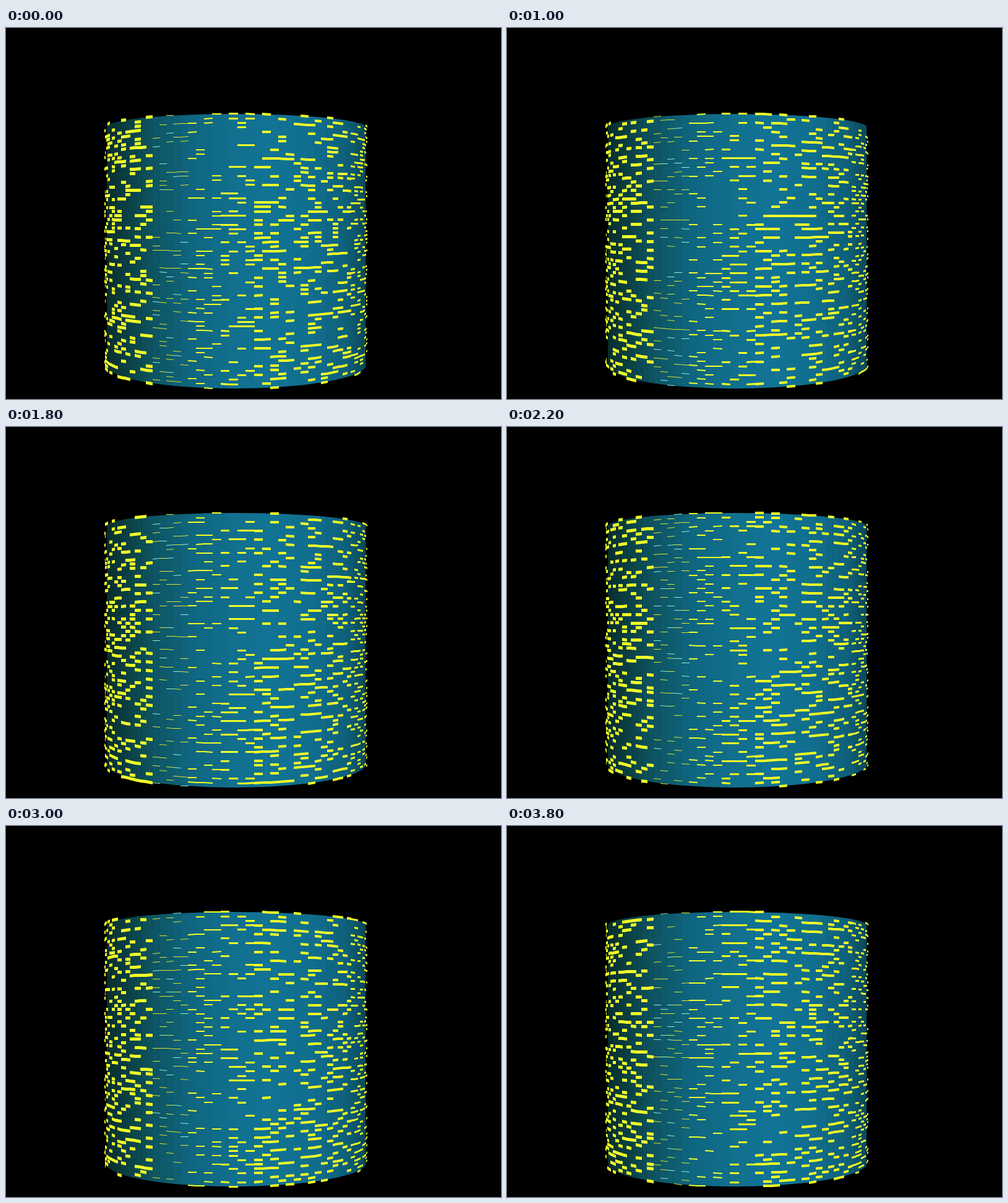
Recreate the animation shown at these times as an HTML page with a canvas. Size 800 by 600 pixels, loop 4 s.

```html
<!DOCTYPE html>
<html lang="en">
<head>
<meta charset="utf-8">
<title>Traffic on a cylinder</title>
<style>
html, body { margin: 0; width: 100%; height: 100%; overflow: hidden; background: #000; }
canvas { display: block; }
</style>
</head>
<body>
<canvas id="stage" width="800" height="600"></canvas>
<script>
const ctx = document.getElementById('stage').getContext('2d');
const ROWS = 63, FIRST = -27, LAST = 23, STEPS = 20, STEP_MS = 200;
const TOP = -0.661, BOTTOM = 1.162, DISTANCE = 6.6, FOCAL = 1363.5;
const STOPS = [[160, 9, 44, 43], [200, 11, 66, 71], [240, 14, 85, 99], [300, 15, 102, 128],
  [370, 18, 112, 143], [430, 18, 115, 149], [500, 17, 109, 141], [550, 15, 96, 122], [585, 11, 70, 84]];

let seed = 20417;
function random() {
  seed = (seed + 0x6D2B79F5) | 0;
  let t = Math.imul(seed ^ (seed >>> 15), 1 | seed);
  t = (t + Math.imul(t ^ (t >>> 7), 61 | t)) ^ t;
  return ((t ^ (t >>> 14)) >>> 0) / 4294967296;
}

// Cars in one lane hop down the ring when the next place is free.
function hop(lane) {
  const next = lane.slice();
  lane.forEach((car, r) => {
    const ahead = (r + 1) % ROWS;
    if (car && !lane[ahead] && random() < 0.88) {
      next[r] = 0;
      next[ahead] = 1;
    }
  });
  return next;
}

function makeLanes() {
  const lanes = [];
  for (let k = FIRST; k <= LAST; k++) {
    lanes.push(Array.from({ length: ROWS }, () => random() < 0.27 ? 1 : 0));
  }
  return lanes;
}

const states = [makeLanes()];
while (states.length < STEPS) {
  states.push(states[states.length - 1].map(lane => hop(hop(hop(lane)))));
}

const angle = k => 0.0776 + k * 2 * Math.PI / 114;

function project(phi, y, radius = 1) {
  const scale = FOCAL / (DISTANCE - Math.cos(phi) * radius);
  return [400 + (Math.sin(phi) * radius - 0.131) * scale, 300 + y * scale];
}

function quad(color, ...points) {
  ctx.fillStyle = color;
  ctx.beginPath();
  points.forEach(p => ctx.lineTo(p[0], p[1]));
  ctx.fill();
}

function shade(x) {
  let i = 1;
  while (i < STOPS.length - 1 && x > STOPS[i][0]) i++;
  const a = STOPS[i - 1], b = STOPS[i];
  const u = Math.max(0, Math.min(1, (x - a[0]) / (b[0] - a[0])));
  return `rgb(${[1, 2, 3].map(j => Math.round(a[j] + (b[j] - a[j]) * u)).join()})`;
}

function drawBody() {
  for (let k = FIRST; k <= LAST; k++) {
    const a = angle(k), b = angle(k + 1);
    const p = project(a, TOP), q = project(b, TOP);
    const r = project(b, BOTTOM), s = project(a, BOTTOM);
    const seam = k < LAST ? 0.7 : 0;
    quad(shade((p[0] + q[0]) / 2), p, [q[0] + seam, q[1]], [r[0] + seam, r[1]], s);
  }
}

function thickness(k) {
  if (k < -12) return 5;
  if (k < -7) return 1;
  if (k < -3) return 2;
  return k < 1 || k > 15 ? 3 : 4;
}

function drawCar(k, row) {
  const y = TOP + (BOTTOM - TOP) * row / (ROWS - 1);
  const radius = k < -12 ? 1.018 : 1.008;
  const p = project(angle(k), y, radius), q = project(angle(k + 1), y, radius);
  const h = thickness(k);
  const x0 = Math.round(p[0]), x1 = Math.round(q[0]) + 1;
  const y0 = Math.round(p[1] - h / 2), y1 = Math.round(q[1] - h / 2);
  const pale = h === 1 && (row * 7 + k * 5 + 200) % 11 < 3;
  quad(pale ? '#8ff0dc' : h === 1 ? '#dce62c' : '#f0ff28',
    [x0, y0], [x1, y1], [x1, y1 + h], [x0, y0 + h]);
}

let shown = -1;
function frame(now) {
  const step = Math.floor(now / STEP_MS) % STEPS;
  if (step !== shown) {
    shown = step;
    ctx.fillStyle = '#000';
    ctx.fillRect(0, 0, 800, 600);
    drawBody();
    states[step].forEach((lane, i) => lane.forEach((car, row) => {
      if (car) drawCar(FIRST + i, row);
    }));
  }
  requestAnimationFrame(frame);
}
frame(performance.now());
</script>
</body>
</html>
```
